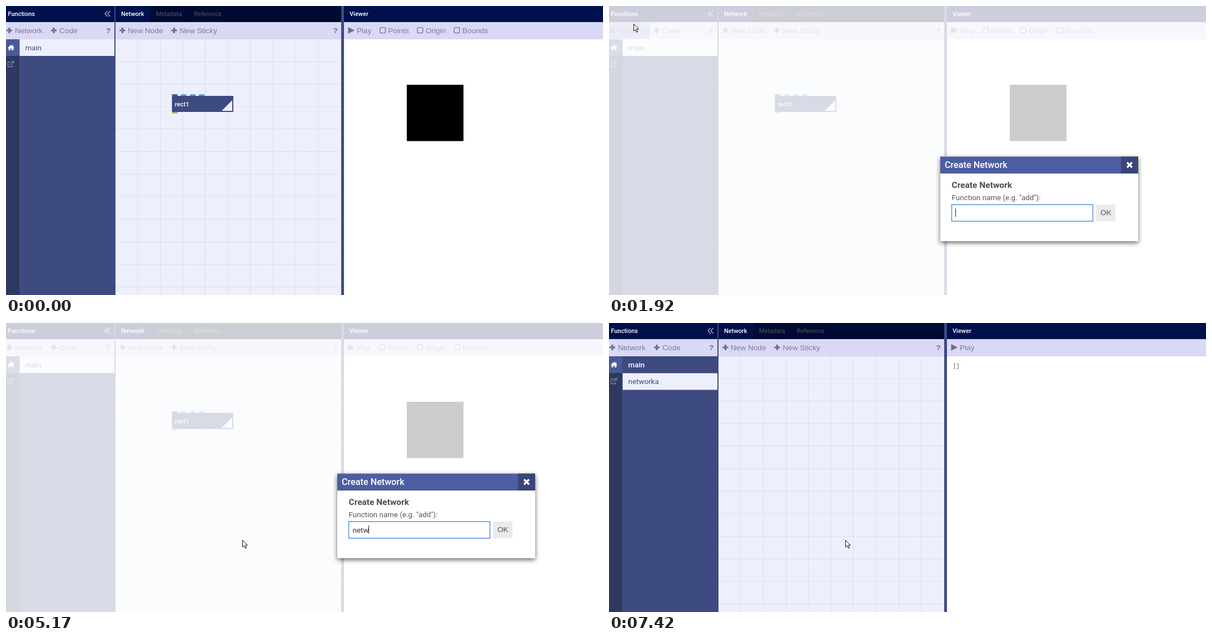
An HTML page that plays this animation: 1074x521 px, repeating every 8 s.

```html
<!DOCTYPE html>
<html lang="en">
<head>
<meta charset="utf-8">
<title>Create network</title>
<style>
  html, body { margin: 0; width: 100%; height: 100%; overflow: hidden; background: #fff; }
  svg { display: block; }
  text { font-family: Roboto, sans-serif; white-space: pre; }
  .tab { font-size: 11px; font-weight: 500; fill: #fff; }
  .off { font-weight: 400; fill: #55555f; }
  .tool { font: 13.6px "Liberation Sans", Arial, sans-serif; fill: #7d7b98; }
  .help { font-weight: bold; fill: #6f6d88; }
  .icon { fill: none; stroke: #6f6d88; }
  .row { font-size: 13.4px; fill: #3e4b80; }
  .navy { fill: #00104d; }
  .slate { fill: #3e4b80; }
  .pale { fill: #edf0fc; }
  .bar { fill: #dad9f5; }
  #dialog rect:first-child { filter: drop-shadow(0 3px 4px rgba(0, 0, 0, .6)); }
</style>
</head>
<body>
<svg width="1074" height="521" viewBox="0 0 1074 521">
  <defs>
    <path id="plus" class="icon" stroke-width="3.2" d="M0-5V5M-5 0H5"/>
    <rect id="box" class="icon" stroke-width="1.3" x=".7" y="38.8" width="9.8" height="9.8" rx="1.8"/>
  </defs>

  <!-- sidebar -->
  <rect class="slate" width="197" height="521"/>
  <rect class="navy" width="195" height="29"/>
  <rect class="bar" y="29" width="195" height="31"/>
  <rect id="hover" y="29" width="73" height="30" fill="#a3a0e6"/>
  <rect y="60" width="24" height="461" fill="#2d3960"/>
  <rect y="60" width="24" height="30" fill="#4a5a98"/>
  <rect id="selected" class="pale" x="24.5" width="170.5" height="30"/>
  <text class="tab" x="3.5" y="18">Functions</text>
  <path d="M182.5 9l-4.5 5 4.5 5M187.5 9l-4.5 5 4.5 5" fill="none" stroke="#a9adc8" stroke-width="1.4"/>
  <use href="#plus" x="6" y="44"/>
  <text class="tool" x="16" y="49">Network</text>
  <use href="#plus" x="86" y="44"/>
  <text class="tool" x="96" y="49">Code</text>
  <text class="tool help" x="180" y="49">?</text>
  <path d="M3 75.5L9 70l2.6 2.4V70.5h1.6v3.3l1.8 1.7-.8.8-.9-.7V80h-3.1v-3.2H7.800V80H4.700v-4.400l-.9.7z" fill="#fff"/>
  <path d="M9 101H4.500q-1 0-1 1v6.500q0 1 1 1H11q1 0 1-1V106M7.500 106l6-6M10.500 100h3.500v3.500" fill="none" stroke="#858aa3" stroke-width="1.3"/>
  <text id="main" class="row" x="34.5" y="80">main</text>
  <text id="added" class="row" x="34.5" y="110">networka</text>

  <!-- network editor -->
  <rect x="197" width="406" height="29" fill="#000a33"/>
  <rect class="navy" x="197" width="63" height="29"/>
  <rect class="bar" x="197" y="29" width="406" height="31"/>
  <rect class="pale" x="197" y="60" width="406" height="461"/>
  <path id="grid" stroke="#dcdfec"/>
  <text class="tab" x="207" y="18">Network</text>
  <text class="tab off" x="270" y="18">Metadata</text>
  <text class="tab off" x="338" y="18">Reference</text>
  <use href="#plus" x="209.500" y="44"/>
  <text class="tool" x="219" y="49">New Node</text>
  <use href="#plus" x="302.500" y="44"/>
  <text class="tool" x="312.500" y="49">New Sticky</text>
  <text class="tool help" x="588.500" y="49">?</text>
  <g id="node">
    <path d="M298.500 160.500h10" stroke="#5c5c70" stroke-width="3"/>
    <path d="M314.500 160.500h10M331 160.500h10M347 160.500h10" stroke="#5aa0dc" stroke-width="3"/>
    <path d="M298.500 192.500h10" stroke="#cfa56a" stroke-width="3"/>
    <rect class="slate" x="298.500" y="162" width="110.500" height="29"/>
    <path class="pale" d="M388 189l19-19v19z"/>
    <text x="303.700" y="181" font-size="11.3" font-weight="500" fill="#fff">rect1</text>
  </g>

  <!-- viewer -->
  <rect class="slate" x="603" width="5" height="521"/>
  <rect class="navy" x="608" width="466" height="29"/>
  <rect class="bar" x="608" y="29" width="466" height="31"/>
  <path d="M197 59.500h406M608 59.500h466" stroke="#d2d2ea"/>
  <text class="tab" x="618" y="18">Viewer</text>
  <path d="M615.500 38l11.500 6-11.500 6z" fill="#6f6d88"/>
  <text class="tool" x="631" y="49">Play</text>
  <g id="shape">
    <use href="#box" x="672"/>
    <text class="tool" x="687" y="49">Points</text>
    <use href="#box" x="739.500"/>
    <text class="tool" x="755" y="49">Origin</text>
    <use href="#box" x="805.500"/>
    <text class="tool" x="821" y="49">Bounds</text>
    <rect x="721" y="142" width="102" height="101.500"/>
  </g>
  <text id="empty" x="618.500" y="81" style="font: 10.5px 'Noto Sans Mono', monospace" fill="#555">[]</text>

  <!-- modal -->
  <g id="modal">
    <rect width="1074" height="521" fill="#fff" opacity=".8"/>
    <g id="dialog">
      <rect x="596" y="271.500" width="356" height="152.500" fill="#fff"/>
      <rect x="596" y="271.500" width="356" height="30.500" fill="#4c5da1"/>
      <rect x="921" y="271.500" width="31" height="30.500" fill="#3a4578"/>
      <path d="M932 282l9 9m0-9l-9 9" stroke="#fff" stroke-width="3.500"/>
      <text x="604" y="292" font-size="16.2" font-weight="500" fill="#fff">Create Network</text>
      <text x="616.500" y="327.500" font-size="15.5" font-weight="700" fill="#4c4c4c">Create Network</text>
      <text x="616.500" y="350" font-size="13.4" fill="#555">Function name (e.g. "add"):</text>
      <rect x="616.500" y="358" width="254" height="30" fill="#fff" stroke="#5b96e6" stroke-width="1.600"/>
      <text id="typed" x="623.500" y="377.500" font-size="13.5" fill="#333"></text>
      <rect id="caret" y="365" width="1" height="15" fill="#111"/>
      <rect x="876.500" y="358" width="34.500" height="30" fill="#ebebeb"/>
      <text class="tool" x="884" y="377" style="fill:#555">OK</text>
    </g>
  </g>

  <!-- pointer -->
  <circle id="click" cx="44" cy="34.500" r="12.500" fill="#e6da1c" opacity=".8"/>
  <g id="pointer" fill="#fff" stroke="#111" stroke-linejoin="round">
    <path id="arrow" d="M.5.5v12.500l2.900-2.700 2.200 4.900 2-.9-2.200-4.700h4z"/>
    <path id="hand" d="M.5 1.500q1.300-1.500 2.500 0V7q1.200-1 2.300.3 1.200-.8 2.200.5 1.700-.5 1.900 1.200v4q0 2-1.500 4.500H1.500Q-.5 14-3.500 10.500q.5-2 2.500-.5l1.500 1.500z"/>
  </g>
</svg>
<script>
const LOOP = 8000, STEP = 72;
const OPEN = 1920, CLOSE = 7420;
const WORD = "networka";
const KEYS = [4320, 4550, 4710, 5170, 5800, 5950, 6110, 6960];
const CARET_OFF = [[2450, 2920], [3470, 4000], [5720, 5800], [6670, 6960]];
const MOVES = [ // start, steps, from, to
  [832, 2, [176, 429], [159, 353]],
  [1140, 7, [159, 353], [44, 32]],
  [2380, 7, [44, 32], [425, 391]],
];

const $ = id => document.getElementById(id);
const show = (id, on) => { $(id).style.display = on ? "" : "none"; };

let grid = "";
for (let i = 0; i < 9; i++) grid += `M${Math.floor(236.7 + i * 40.65) + .5} 60V521`;
for (let i = 0; i < 11; i++) grid += `M197 ${Math.floor(100 + i * 40.65) + .5}H603`;
$("grid").setAttribute("d", grid);

function pointerAt(t) {
  const [start, steps, from, to] = MOVES.findLast(m => t >= m[0]) || MOVES[0];
  const done = Math.floor((t - start) / STEP) + 1;
  const p = Math.max(0, Math.min(1, done / steps));
  const eased = p * p * (3 - 2 * p);
  return from.map((v, i) => Math.round(v + (to[i] - v) * eased));
}

function draw(t) {
  const modal = t >= OPEN && t < CLOSE, created = t >= CLOSE;
  const [x, y] = pointerAt(t);
  const hover = x < 73 && y >= 29 && y < 59;

  show("hover", hover);
  show("node", !created);
  show("shape", !created);
  show("empty", created);
  show("added", created);
  show("modal", modal);
  $("selected").setAttribute("y", created ? 90.5 : 60);
  $("main").style.fill = created ? "#fff" : "";
  $("main").style.fontWeight = created ? 500 : 400;

  $("typed").textContent = WORD.slice(0, KEYS.filter(k => t >= k).length);
  show("caret", !CARET_OFF.some(([a, b]) => t >= a && t < b));
  if (modal) $("caret").setAttribute("x", Math.floor(623.5 + $("typed").getComputedTextLength()));

  show("pointer", t >= 760);
  show("hand", hover && !modal);
  show("arrow", !hover || modal);
  show("click", t >= 1710 && t < OPEN);
  $("pointer").setAttribute("transform", `translate(${x} ${y})`);
}

const begin = performance.now();
function tick() {
  draw((performance.now() - begin) % LOOP);
  requestAnimationFrame(tick);
}
tick();
</script>
</body>
</html>
```
